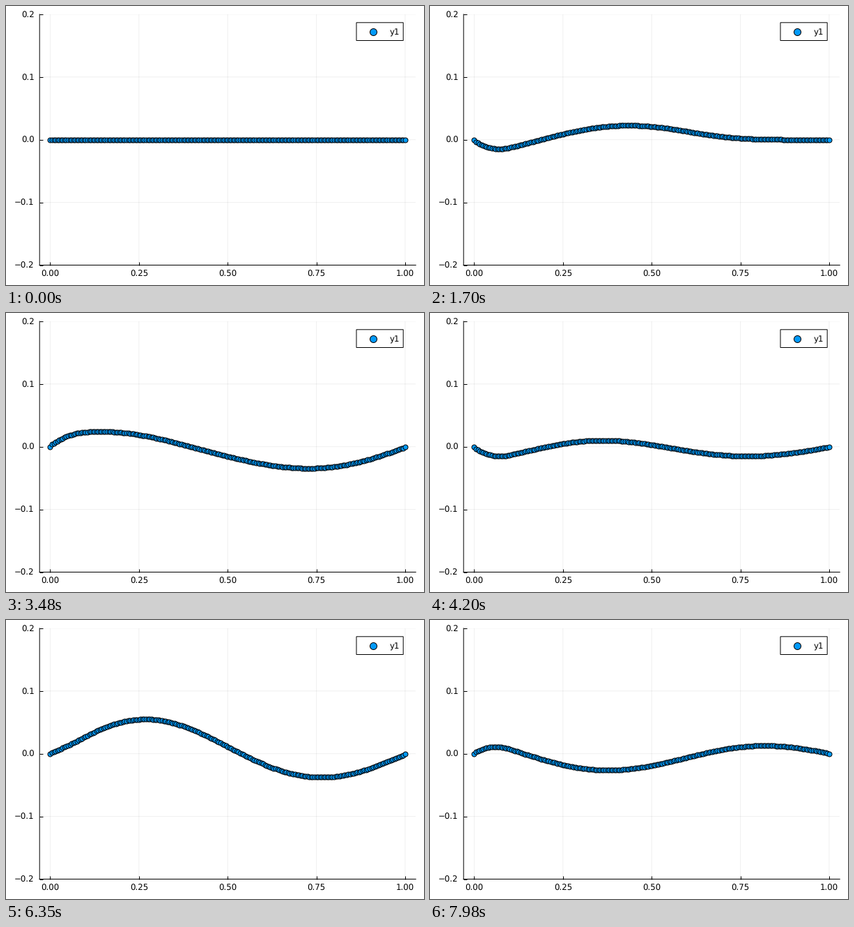
These frames come from a looping animation (600x400 px, 8000 ms). A matplotlib script:

```python
import numpy as np
import matplotlib.pyplot as plt
from matplotlib.animation import FuncAnimation
from matplotlib.patches import Rectangle

W, H, DPI = 600, 400, 100
PX = 72 / DPI                      # points per pixel
BLUE = "#009afa"
FONT = dict(family="DejaVu Sans", size=11.8 * PX, color="black")
plt.rcParams["path.snap"] = False
plt.rcParams["text.hinting"] = "none"

N, FRAMES = 201, 320
DT = 0.01
x = np.linspace(0, 1, N)
dx = 1 / (N + 1)                   # walls sit one cell outside the nodes


def simulate():
    """Implicit steps of u_tt = u_xx + f, driven by a sine on the first tenth."""
    lap = (np.eye(N, k=1) - 2 * np.eye(N) + np.eye(N, k=-1)) / dx**2
    step = np.linalg.inv(np.eye(N) - DT**2 * lap)
    push = np.zeros(N)
    push[:N // 10] = 5.0
    old, u = np.zeros(N), np.zeros(N)
    rows = []
    for n in range(1, FRAMES + 1):
        force = push * np.sin(2 * np.pi * n * DT)
        old, u = u, step @ (2 * u - old + DT**2 * force)
        shown = u.copy()
        shown[[0, -1]] = 0
        rows.append(shown)
    return rows


waves = simulate()

fig = plt.figure(figsize=(W / DPI, H / DPI), dpi=DPI, facecolor="white")
left, top, right, bottom = 48.2, 11.9, 588.2, 371.5
ax = fig.add_axes([left / W, 1 - bottom / H, (right - left) / W, (bottom - top) / H])
ax.set_xlim(-0.03, 1.03)
ax.set_ylim(-0.2, 0.2)
ax.set_axisbelow(True)
ax.grid(color="black", alpha=0.06, linewidth=PX)
for side in ("top", "right"):
    ax.spines[side].set_visible(False)
for side in ("left", "bottom"):
    ax.spines[side].set_linewidth(PX)
    ax.spines[side].set_zorder(1.5)
ax.tick_params(direction="in", length=5 * PX, width=PX, labelleft=False, labelbottom=False)
xticks = [0, 0.25, 0.5, 0.75, 1]
yticks = [-0.2, -0.1, 0, 0.1, 0.2]
ax.set_xticks(xticks)
ax.set_yticks(yticks)


def label(px, py, text, ha):
    fig.text(px / W, 1 - py / H, text, ha=ha, va="center_baseline", **FONT)


for v in xticks:
    label(left + (v + 0.03) / 1.06 * (right - left), 383.3, f"{v:.2f}", "center")
for v in yticks:
    label(40.6, bottom - (v + 0.2) / 0.4 * (bottom - top),
          f"{v:.1f}".replace("-", "\u2212"), "right")

dot = dict(linestyle="none", marker="o", markerfacecolor=BLUE,
           markeredgecolor="black", markeredgewidth=PX, clip_on=False, snap=False)
dots, = ax.plot(x, waves[0], markersize=7 * PX, zorder=3, **dot)

# legend, laid out in pixels
key = fig.add_axes([0, 0, 1, 1], facecolor="none")
key.set_xlim(0, W)
key.set_ylim(H, 0)
key.axis("off")
key.add_patch(Rectangle((503, 23.8), 67.2, 25.7, facecolor="white",
                        edgecolor="black", linewidth=PX))
key.plot([527], [36.7], markersize=10 * PX, zorder=3, **dot)
key.text(550.6, 37, "y1", ha="left", va="center_baseline", **FONT)


def draw(i):
    dots.set_ydata(waves[i])
    return dots,


anim = FuncAnimation(fig, draw, frames=FRAMES, interval=25, repeat=True,
                     repeat_delay=0, blit=False)
plt.show()
```
